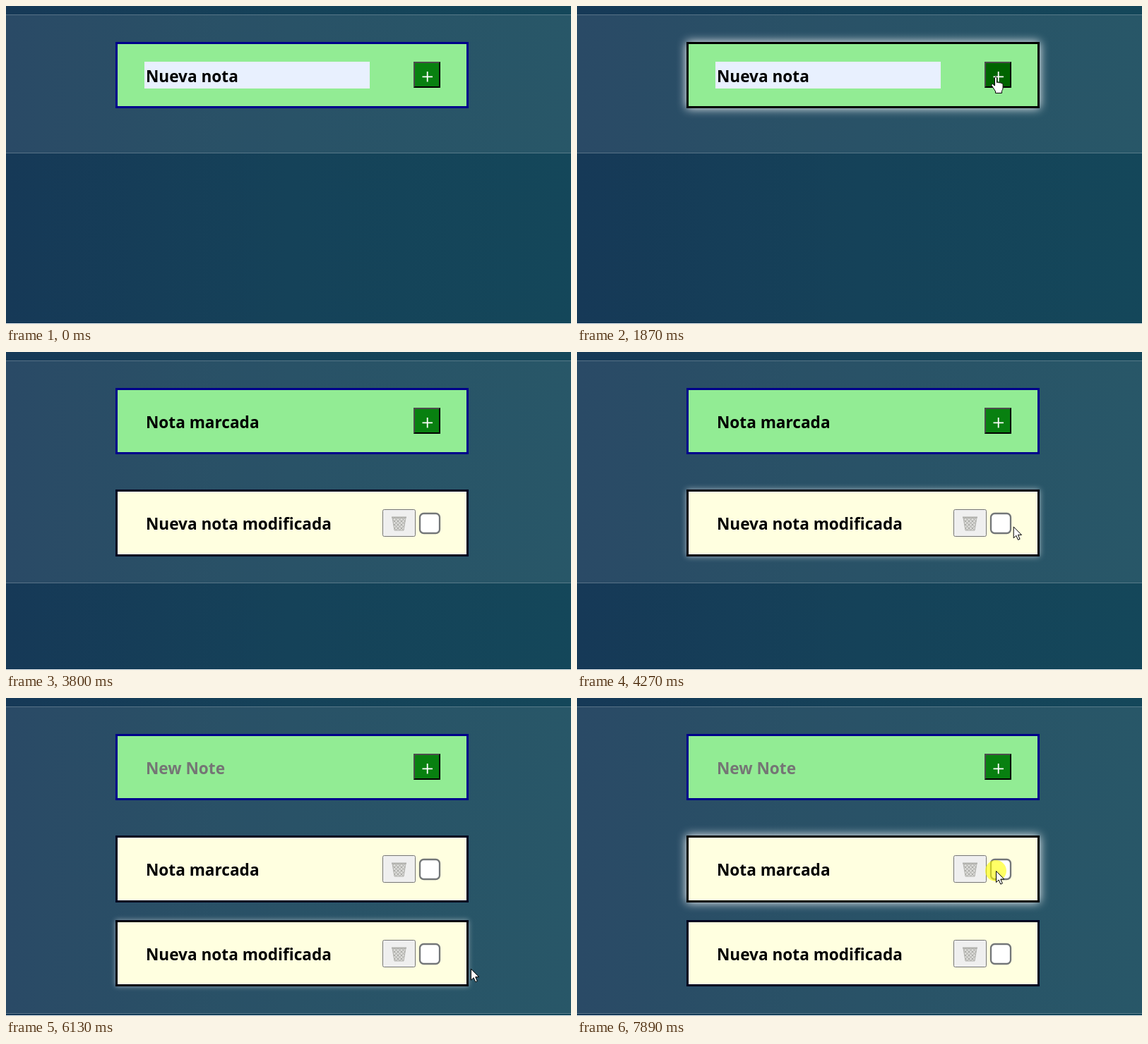
Write an HTML page that moves like this. It is 800 px wide and 451 px high and loops after 8 s.

```html
<!DOCTYPE html>
<html lang="es">
<head>
<meta charset="utf-8">
<title>Notas</title>
<style>
  html, body { margin: 0; width: 100%; height: 100%; overflow: hidden; }
  svg { display: block; }
  text { font: 700 22.6px "Open Sans", "Noto Sans", sans-serif; }
</style>
</head>
<body>
<svg width="800" height="451" viewBox="0 0 800 451">
  <defs>
    <linearGradient id="sky">
      <stop offset="0" stop-color="#163957"/>
      <stop offset=".5" stop-color="#154259"/>
      <stop offset="1" stop-color="#14475a"/>
    </linearGradient>
    <pattern id="mesh" width="5" height="5" patternUnits="userSpaceOnUse">
      <rect width="5" height="5" fill="#dadad7"/>
      <path d="M0 0l5 5M5 0l-5 5" stroke="#a6a6a2" stroke-width=".9"/>
    </pattern>
    <g id="tools">
      <rect x="533.5" y="28.5" width="46" height="38" rx="2" fill="#efefef" stroke="#767676"/>
      <path d="M547 40h19l-3 18h-13z" fill="url(#mesh)" stroke="#b4b4b0"/>
      <path d="M546 39.5h21" stroke="#b0b0ac" stroke-width="2"/>
      <rect x="586" y="34" width="28" height="28" rx="5.5" fill="#fff" stroke="#737678" stroke-width="2.3"/>
    </g>
  </defs>

  <rect width="800" height="451" fill="url(#sky)"/>
  <rect id="panel" x="-1" y="12.5" width="802" fill="#fff" fill-opacity=".085" stroke="#fff" stroke-opacity=".25"/>
  <rect y="450" width="800" height="1" fill="#f2f4f5"/>
  <g id="cards"></g>

  <rect id="autofill" x="196" y="79" width="319" height="38" fill="#e8f0fe"/>
  <g id="focus" fill="none">
    <rect x="194.5" y="77.5" width="322" height="41" rx="4" stroke="#fff"/>
    <rect x="196" y="79" width="319" height="38" rx="3" stroke="#101010" stroke-width="2"/>
    <path d="M356.5 82v32" stroke="#000"/>
  </g>
  <text id="entry" x="198" y="108"></text>

  <rect id="add" x="577" y="79" width="38" height="37"/>
  <path d="M577 79h38l-2 2h-34v33l-2 2z" fill="#4c4c4c"/>
  <path d="M615 116h-38l2-2h34v-33l2-2z"/>
  <path d="M589.5 100.3h14.5M596.7 93v14.6" stroke="#fff" stroke-width="1.8"/>

  <g id="pointer" fill="#fff" stroke="#000" stroke-linejoin="round">
    <circle id="click" r="15" fill="#ff0" fill-opacity=".6" stroke="none"/>
    <path id="arrow" d="M.5.5v16l3.7-3.5 2.6 6 2.6-1.1-2.6-5.9h5z"/>
    <path id="hand" d="M-1.5 1.5q1.5-2 3 0v7q1.5-1.2 3 .4q1.6-.9 2.9.6q2.2-.6 2.7 1.5v5q0 2.5-1.6 4.5v3h-9v-2.5l-5.6-8.5q-.4-2 1.6-2l3 2.5z"/>
  </g>
</svg>

<script>
const LOOP = 8000;
const GLOW_TIME = 200;
const ADDED = [1940, 5410];   // a note joins the list
const RENAMED = 3800;
const CLICKS = [1600, 5150, 7890];
const CLICK_TIME = 265;

// The pointer comes in from below, rests, and leaves downwards
const strokes = [
  { start: 450, end: 1260, from: [684, 328], to: [593, 100] },
  { start: 2460, end: 2860, from: [593, 100], to: [673, 455] },
  { start: 3990, end: 4880, from: [646, 357], to: [596, 91] },
  { start: 5870, end: 6650, from: [596, 91], to: [673, 455] },
  { start: 6740, end: 7560, from: [679, 434], to: [593, 245] }
];

const $ = id => document.getElementById(id);
const show = (el, on) => el.setAttribute('visibility', on ? 'visible' : 'hidden');
const easeOut = (k, power) => 1 - (1 - k) ** power;

function pointerAt(t) {
  const stroke = strokes.findLast(s => t >= s.start);
  if (!stroke) return [0, 500];
  const { start, end, from, to } = stroke;
  const k = Math.min(1, (t - start) / (end - start));
  const powers = to[1] > from[1] ? [4, 4] : [2.2, 1.4];
  return from.map((v, i) => v + (to[i] - v) * easeOut(k, powers[i]));
}

function over(t, left, top, right, bottom) {
  const [x, y] = pointerAt(t);
  return x >= left && x < right && y >= top && y < bottom;
}

// Grows while the pointer stays on the card, ends at once when it leaves
function glowAt(t, { y, h }) {
  let age = 0;
  while (age < GLOW_TIME && over(t - age, 155, y, 660, y + h)) age += 5;
  return age / GLOW_TIME;
}

const cards = [
  { y: 51, h: 94, fill: '#92ec94', edge: '#00008b', from: 0 },
  ...ADDED.map((from, i) => ({ y: 195 + 120 * i, h: 95 - i, fill: '#ffffe0', edge: '#000020', from }))
];
$('cards').innerHTML = cards.map(({ y, h, fill }, i) => `<g>
  <rect x="155" y="${y}" width="500" height="${h}" fill="#fff"/>
  <rect x="156.5" y="${y + 1.5}" width="497" height="${h - 3}" fill="${fill}" stroke-width="3"/>
  ${i ? `<use href="#tools" y="${y}"/><text x="198" y="${y + 57}"></text>` : ''}</g>`).join('');
cards.forEach((card, i) => {
  card.el = $('cards').children[i];
  [card.glow, card.box, , card.label] = card.el.children;
});

function draw(t) {
  const notes = ADDED.filter(from => t >= from).length;
  $('panel').setAttribute('height', Math.floor(196 + 119.5 * notes));

  for (const card of cards) {
    const glow = glowAt(t, card);
    show(card.el, t >= card.from);
    card.glow.style.opacity = glow;
    card.glow.style.filter = `blur(${7 * glow}px)`;
    card.box.style.stroke = `color-mix(in srgb, #000 ${100 * glow}%, ${card.edge})`;
  }

  const [first, second] = ADDED;
  const older = t < RENAMED ? 'Nueva nota' : 'Nueva nota modificada';
  cards[1].label.textContent = t < second ? older : 'Nota marcada';
  cards[2].label.textContent = older;

  const typed = t < first ? 'Nueva nota' : t >= RENAMED && t < second ? 'Nota marcada' : '';
  $('entry').textContent = typed || 'New Note';
  $('entry').setAttribute('fill', typed ? '#000' : '#757575');
  show($('autofill'), t < first);
  show($('focus'), t >= CLICKS[1] && t < CLICKS[1] + 70);

  const clicking = CLICKS.some(c => t >= c && t < c + CLICK_TIME);
  const onButton = over(t, 577, 79, 615, 116);
  $('add').setAttribute('fill', !onButton ? '#088010' : clicking ? '#004000' : '#006400');
  $('pointer').setAttribute('transform', `translate(${pointerAt(t)})`);
  show($('click'), clicking);
  show($('arrow'), !onButton);
  show($('hand'), onButton);
}

const start = performance.now();
(function frame() {
  draw((performance.now() - start) % LOOP);
  requestAnimationFrame(frame);
})();
</script>
</body>
</html>
```
